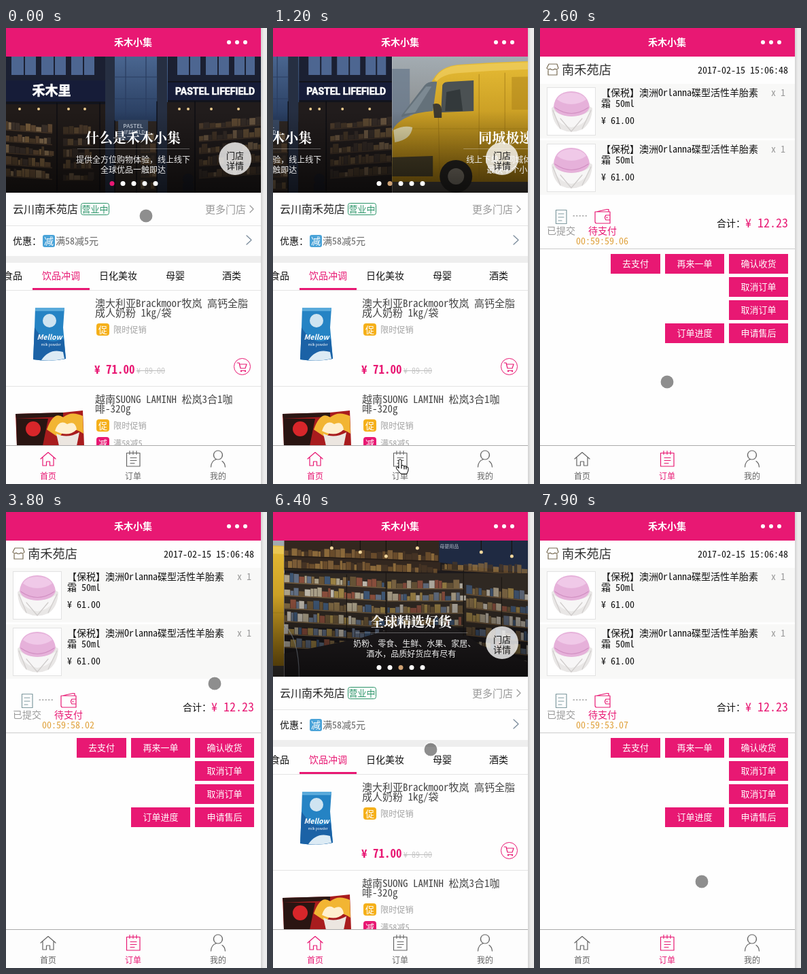
An HTML page for the animation above (8 s loop, 384 by 670 pixels).

```html
<!DOCTYPE html>
<html lang="zh">
<head>
<meta charset="utf-8">
<style>
html, body { margin: 0; width: 100%; height: 100%; overflow: hidden; background: #fff }
svg { display: block; width: 384px; height: 670px }
text { font-family: "Noto Sans CJK SC", "Noto Sans", sans-serif; white-space: pre }
.m { font-family: "Noto Sans Mono CJK SC", "Noto Sans CJK SC", monospace }
.k { font-family: "Noto Serif CJK SC", "Noto Sans CJK SC", serif; font-weight: bold }
.l { fill: none; stroke-width: 1.2; stroke-linejoin: round; stroke-linecap: round }
</style>
</head>
<body>
<svg id="stage" viewBox="0 0 384 670"></svg>
<script>
const PINK = '#e81873', LOOP = 8000;
const $ = id => document.getElementById(id);

let seed = 7;
const rnd = () => (seed = seed * 16807 % 2147483647) / 2147483647;

// cy is the middle of the glyphs
const text = (x, cy, size, str, fill, cls = 'm', more = '') =>
  `<text class="${cls}" x="${x}" y="${cy + size * .38}" font-size="${size}" fill="${fill}" ${more}>${str}</text>`;
const mid = (x, cy, size, str, fill, cls = '', more = '') =>
  text(x, cy, size, str, fill, cls, 'text-anchor="middle" ' + more);
const box = (x, y, w, h, fill, more = '') =>
  `<rect x="${x}" y="${y}" width="${w}" height="${h}" fill="${fill}" ${more}/>`;
const dot = (x, y, r, fill, more = '') => `<circle cx="${x}" cy="${y}" r="${r}" fill="${fill}" ${more}/>`;
const shape = (d, fill, more = '') => `<path d="${d}" fill="${fill}" ${more}/>`;
const line = (d, color, more = '') => `<path class="l" d="${d}" stroke="${color}" ${more}/>`;
const rule = (y, color = '#e4e4e4') => box(0, y, 375, 1, color);

// rows of goods on boards, leaning by the angle tilt
function shelves(x, y, w, rows, gap, colors, board, tilt = 0, opacity = 1) {
  let s = '';
  for (let r = 0; r < rows; r++) {
    const base = (r + 1) * gap;
    for (let i = 0; i < w - 4;) {
      const bw = 3 + rnd() * 6, bh = gap * (.35 + rnd() * .4);
      s += box(i.toFixed(1), (base - bh).toFixed(1), bw.toFixed(1), bh.toFixed(1),
        colors[rnd() * colors.length | 0]);
      i += bw + .5;
    }
    s += box(0, base, w, 1.5, board);
  }
  return `<g transform="translate(${x} ${y}) skewY(${tilt})" opacity="${opacity}">${s}</g>`;
}

const caption = (title, a, b, ax = 187) =>
  box(105, 177, 165, 1, '#fff', 'opacity=".3"') +
  mid(187, 161, 20, title, '#fff', 'k') +
  mid(ax, 193, 12, a, '#eee') + mid(187, 208, 12, b, '#eee');

function storefront() {
  const goods = ['#8f6f45', '#5f4930', '#a48660', '#463a31', '#74583b'];
  const panes = [[8, 36], [52, 36], [96, 34], [252, 34], [294, 34], [336, 30]];
  return box(0, 42, 375, 200, '#12141c') + box(0, 42, 375, 36, '#1b2032') +
    panes.map(([x, w]) => box(x, 42, w, 27, '#4d6691') + box(x + w / 2, 42, 2, 27, '#1b2032')).join('') +
    box(0, 77, 148, 31, '#161c38') + box(236, 80, 139, 26, '#161c38') +
    box(146, 42, 92, 96, 'url(#glass)') + box(146, 42, 14, 200, '#262f42') + box(222, 42, 15, 200, '#262f42') +
    line('M176 42V135M206 42V135M160 72H222M160 104H222', '#2a3d60') +
    box(0, 112, 146, 130, '#211b19') + shelves(0, 132, 68, 5, 17, goods, '#584330', 4, .8) +
    shelves(84, 138, 44, 5, 17, goods, '#4d3a29', 0, .5) +
    box(160, 137, 62, 105, '#2e2723') + shelves(198, 146, 24, 5, 18, goods, '#584330', 0, .6) +
    box(237, 109, 138, 133, '#211c1c') + shelves(284, 130, 91, 5, 18, goods, '#584330', -4, .55) +
    line('M75 110V242M138 110V242M160 136V242M192 138V242M222 108V242M278 108V242', '#090b11', 'stroke-width="5"') +
    [20, 48, 92, 116, 255, 268, 302, 342].map(x => dot(x, 119, 2, '#e9c98d')).join('') +
    dot(268, 222, 8, '#191a22') + box(260, 228, 16, 14, '#191a22') +
    box(165, 135, 44, 30, '#3a4a64') +
    mid(187, 144, 8, 'PASTEL', '#b9c3d2', '', 'font-weight="bold"') +
    mid(187, 153, 7, 'LIFEFIELD', '#b9c3d2', '', 'font-weight="bold"') +
    mid(67, 92, 19, '禾木里', '#fff', '', 'font-weight="bold" stroke="#fff" stroke-width=".6"') +
    text(249, 93, 14, 'PASTEL LIFEFIELD', '#fff', '',
      'style="font-family:Roboto,sans-serif;font-weight:bold" stroke="#fff" stroke-width=".6"') +
    box(0, 42, 375, 200, 'url(#shade)') +
    caption('什么是禾木小集', '提供全方位购物体验，线上线下', '全球优品一触即达');
}

function van() {
  return box(0, 42, 375, 200, 'url(#street)') + box(0, 60, 26, 88, '#66778a', 'opacity=".7"') +
    box(0, 200, 375, 42, '#47423d') +
    shape('M0 216V152Q6 136 30 128L60 76Q70 57 96 54Q230 44 375 50V226H0Z', 'url(#paint)') +
    shape('M62 76Q71 58 96 55Q230 46 375 51V62Q230 56 100 66Q76 67 66 78Z', '#f0cf62', 'opacity=".7"') +
    shape('M14 128L48 84Q53 78 66 79L60 122Q38 124 14 131Z', '#64717a') +
    shape('M18 126L50 86H58L34 124Z', '#8c9aa2', 'opacity=".6"') +
    shape('M74 84Q76 79 84 79L120 77V122L72 124Z', '#4b5153') +
    shape('M80 94L100 90L104 122H78Z', '#33393b') +
    shape('M176 72L258 70V120H176Z', '#a67c17', 'opacity=".45"') +
    line('M68 126L70 212M128 68V218M166 66V218M266 64V218', '#9a7414', 'opacity=".6"') +
    line('M30 148H375', '#aa8015', 'stroke-width="3" opacity=".7"') +
    shape('M60 112Q72 108 73 120V132H62Z', '#3d3a31') +
    shape('M2 150Q18 142 30 146Q28 164 4 168Z', '#e3d9a8') +
    shape('M0 190L60 188V218H0Z', '#4a4128') +
    dot(94, 218, 24, '#262421') + dot(94, 218, 12, '#777166') + dot(318, 220, 24, '#262421') +
    box(0, 42, 375, 200, 'url(#shade)') +
    caption('同城极速配送', '线上下单，同城体验极速配送', '最快半个小时送达');
}

function aisle() {
  const goods = ['#b9ad94', '#8a7048', '#cbc5b8', '#66758c', '#93513f', '#405a7d', '#6d5738', '#a68a48'];
  const warm = ['#76552f', '#a27b42', '#4a3826', '#8c6a3c'];
  return box(0, 42, 375, 200, '#1d1a1c') + box(0, 42, 230, 44, '#33271f') +
    shelves(0, 46, 228, 2, 18, warm, '#211914', 2, .8) +
    shape('M228 42H375V92L228 74Z', '#1f2a42') + mid(243, 50, 7, '母婴用品', '#b4bccb') +
    shelves(232, 66, 143, 2, 18, warm, '#6a4d2c', 3, .75) +
    box(0, 90, 375, 80, '#2f2822') + shelves(0, 84, 150, 6, 19, goods, '#7d6444', 3, .9) +
    shelves(152, 94, 112, 4, 18, goods, '#7d6444', 0, .8) +
    shelves(268, 100, 107, 6, 20, goods, '#75593a', 6, .75) +
    shape('M0 208L110 186L175 166H245L290 196L375 226V242H0Z', '#242022') +
    line('M92 92V188M150 88V178M264 86V182M320 96V210', '#1c1714', 'stroke-width="4"') +
    [70, 112, 150, 196, 290, 335].map((x, i) =>
      line(`M${x} 42V${50 + i % 3 * 6}`, '#17130f') + dot(x, 53 + i % 3 * 6, 2.5, '#f2d79c')).join('') +
    line('M0 166Q22 185 22 242', '#b9c6d6', 'opacity=".6"') +
    box(0, 42, 375, 200, 'url(#shade)') +
    caption('全球精选好货', '奶粉、零食、生鲜、水果、家居、', '酒水，品质好货应有尽有', 192);
}

const badge = (y, str, color, note) => box(133, y - 9, 19, 18, color, 'rx="4"') +
  mid(142.5, y, 13, str, '#fff') + text(158, y, 12.2, note, '#a4a4a4');

const pouch = shape('M43 411H86L84 440L88 486Q64 491 40 487L42 440Z', '#2583c4') +
  shape('M43 411H86L85.5 416H43Z', '#5aaadb') + shape('M42 440L40 487Q64 491 88 486L85 456Q60 470 42 440Z', '#1b62a6') +
  dot(64, 430, 10, '#cfe4f1') +
  mid(64, 454, 10.5, 'Mellow', '#fff', '', 'font-style="italic" font-weight="bold"') +
  mid(66, 465, 5, 'milk powder', '#fff') + shape('M52 488Q64 470 84 476L86 486Q68 490 52 488Z', '#dcebf5');

const coffee = shape('M14 567L84 565L113 562L115 614H16Z', '#a81c1e') + shape('M14 567L84 565V571L15 574Z', '#2b1714') +
  shape('M15 574H62L54 614H16Z', '#2a1512') + dot(40, 589, 11, '#d8262a') +
  shape('M60 590Q70 562 84 572Q96 562 113 570L114 596Q90 580 78 602Z', '#f2b533') +
  shape('M72 592Q78 574 90 582Q102 576 104 590Q92 602 72 592Z', '#fff0cf') +
  shape('M74 596Q90 604 108 594L104 614H78Z', '#ece6e0');

const home = () => box(0, 42, 375, 572, '#fefefe') +
  `<g clip-path="url(#frame)"><g id="slides">` +
  [storefront(), van(), aisle()].map((s, i) =>
    `<g transform="translate(${i * 375})" clip-path="url(#frame)">${s}</g>`).join('') + '</g></g>' +
  dot(337, 192, 24, '#fff', 'opacity=".78"') + mid(337, 187, 13, '门店', '#111') + mid(337, 202, 13, '详情', '#111') +
  [0, 1, 2, 3, 4].map(i => dot(156 + i * 16, 228.5, 3.5, '#fff', 'class="page"')).join('') +
  text(10, 266, 16, '云川南禾苑店', '#222') +
  box(110.5, 257.5, 41, 17, 'none', 'rx="3" stroke="#2a9468"') + mid(131, 266, 13, '营业中', '#2a9468') +
  text(293, 266, 15, '更多门店', '#999') + line('M359 261L364 266L359 271', '#999') + rule(290) +
  text(10, 313, 14, '优惠：', '#111') + box(54, 304, 18, 18, '#4aa3d8', 'rx="3"') +
  mid(63, 313, 14, '减', '#fff') + text(73, 313, 14, '满58减5元', '#666') +
  line('M354 305L361 311.5L354 318', '#789') + box(0, 335, 375, 10, '#eee') +
  [['食品', 10], ['饮品冲调', 81], ['日化美妆', 165], ['母婴', 249], ['酒类', 332]].map(([s, x], i) =>
    mid(x, 364, 14, s, i == 1 ? PINK : '#111')).join('') +
  rule(385) + box(39, 382, 84, 3, PINK) + pouch +
  text(131, 404, 15, '澳大利亚Brackmoor牧岚 高钙全脂', '#444') + text(131, 418, 15, '成人奶粉 1kg/袋', '#444') +
  badge(443, '促', '#f5b01a', '限时促销') +
  text(130, 502, 17, '¥ 71.00', PINK, 'm', 'font-weight="bold"') +
  text(192, 503, 12, '¥ 89.00', '#c8c8c8') + box(192, 503, 42, 1, '#bbb') +
  dot(347.5, 497.5, 12, '#fff', `stroke="${PINK}"`) +
  line('M340 492H343L345 500H352L354 494H344M346 503.5H352', PINK) +
  dot(346, 504, 1.2, PINK) + dot(352, 504, 1.2, PINK) + rule(526) + coffee +
  text(131, 545, 15, '越南SUONG LAMINH 松岚3合1咖', '#444') + text(131, 559, 15, '啡-320g', '#444') +
  badge(584, '促', '#f5b01a', '限时促销') + badge(610, '减', PINK, '满58减5');

const jar = `<rect x="10.5" y="87.5" width="71" height="70" fill="#fff" stroke="#e2e2e2"/>` +
  shape('M17 118Q20 112 46 112Q72 112 77 118Q76 140 62 149Q46 156 31 149Q18 140 17 118Z', '#e9e7e6') +
  shape('M20 122Q46 138 74 122Q70 142 46 146Q24 142 20 122Z', '#f7f6f6') +
  line('M19 121L30 148M75 121L62 148M30 133L46 152L62 133', '#cfcccb') +
  shape('M20 116Q22 94 46 93Q70 94 73 116Q70 129 46 130Q24 129 20 116Z', '#e6b1da') +
  shape('M25 105Q30 95 46 95Q62 95 68 105Q58 112 46 112Q34 112 25 105Z', '#f0c9e8') +
  line('M22 117Q46 134 71 117', '#d18fc2');

const item = dy => `<g transform="translate(0 ${dy})">` + box(0, 82, 375, 80, '#f8f8f7') + jar +
  text(90, 95, 14, '【保税】澳洲Orlanna碟型活性羊胎素', '#111') + text(90, 111, 14, '霜 50ml', '#111') +
  text(90, 136, 14, '¥ 61.00', '#111') + text(340, 95, 14, 'x 1', '#999') + '</g>';

const button = (x, y, w, str) => box(x, y, w, 29, PINK) + mid(x + w / 2, y + 14.5, 13, str, '#fff');

const order = () => box(0, 42, 375, 572, '#fefefe') +
  line('M13 53H25L27 59Q25 62 22 60Q18.500 63 15 60Q12 62 10 59ZM12 62V69H25V62', '#776a52') +
  text(32, 61, 18.3, '南禾苑店', '#333') + text(232, 62, 14, '2017-02-15 15:06:48', '#111') +
  item(0) + item(83) +
  line('M23.500 267.500H39V287.500H23.500ZM27 273H35M27 278H35M27 283H32', '#7f9a9f') +
  line('M49 276H70', '#777', 'stroke-dasharray="1.500 3" stroke-width="1.500"') +
  line('M83 270L98 266.500H101V270M81 270H103V287H83Q81 287 81 284ZM103 275H97Q94 278.500 97 282H103', PINK) +
  dot(98.5, 278.5, 1, PINK) +
  text(10, 298, 14, '已提交', '#999') + text(71, 298, 14, '待支付', PINK) +
  text(53, 313, 14, '', '#e0a23c', 'm', 'id="timer"') +
  text(260, 287, 14, '合计：', '#111') + text(302, 286, 18, '¥ 12.23', PINK) + rule(324, '#ccc') +
  button(104, 332, 73, '去支付') + button(184, 332, 87, '再来一单') + button(278, 332, 87, '确认收货') +
  button(278, 366, 87, '取消订单') + button(278, 400, 87, '取消订单') +
  button(184, 434, 87, '订单进度') + button(278, 434, 87, '申请售后');

const tab = (id, x, label, d) => `<g id="${id}" stroke="#666" fill="#666"><path class="l" d="${d}"/>` +
  `<text x="${x}" y="662.500" font-size="12" stroke="none" text-anchor="middle">${label}</text></g>`;

const fade = (id, from, to) => `<linearGradient id="${id}" x2="0" y2="1"><stop stop-color="${from}"/>` +
  `<stop offset="1" stop-color="${to}"/></linearGradient>`;

$('stage').innerHTML = `<defs>
  <clipPath id="frame"><rect y="42" width="375" height="200"/></clipPath>
  ${fade('glass', '#4a6690', '#263a5c')}${fade('street', '#a3acb2', '#6d6862')}${fade('paint', '#e6bb34', '#a87c12')}
  <linearGradient id="shade" x2="0" y2="1"><stop offset=".4" stop-opacity="0"/><stop offset="1" stop-opacity=".6"/></linearGradient>
  <linearGradient id="edge"><stop stop-color="#d2d2d2"/><stop offset=".5" stop-color="#ececec"/></linearGradient>
  </defs>` + box(0, 0, 384, 670, '#fefefe') +
  `<g id="home">${home()}</g><g id="order">${order()}</g>` + box(0, 42, 0, 2, '#4caf50', 'id="bar"') +
  box(0, 613, 375, 57, '#fdfdfd') + rule(613, '#aaa') +
  tab('tabHome', 62, '首页', 'M51 633L62 623.500L73 633M54 631V643H59.500V637H64.500V643H70V631') +
  tab('tabOrder', 187, '订单', 'M177.500 624.500H197V644H177.500ZM182 621.500V626.500M187 621.500V626.500M192 621.500V626.500M183 631.500H192M183 635.500H192M183 639.500H189') +
  tab('tabMine', 312, '我的', 'M312 621A6.500 6.500 0 1 1 311.900 621M301.500 645Q302 636 309 634M318 636.500Q322 639 322.500 645') +
  box(0, 0, 375, 42, PINK) + mid(187, 21, 14, '禾木小集', '#fff', '', 'font-weight="bold"') +
  [328, 340, 352].map(x => dot(x, 21, 3, '#fff')).join('') + box(375, 0, 9, 670, 'url(#edge)') +
  `<g id="touch">${dot(0, 0, 9.5, '#000', 'opacity=".44"')}${dot(0, 0, 10.4, 'none', 'stroke="#fff" stroke-opacity=".45" stroke-width="1.500"')}</g>` +
  `<g id="hand">${shape('M-2 1Q0 -2 2 1V9Q4 7 6 10Q8 8 9 11Q12 10 12 13V16L10 21H1L-5 14Q-7 10 -3 11L-2 13Z', '#fff', 'stroke="#000"')}${line('M2 9V13M6 10V14M9 11V14', '#000', 'stroke-width=".8"')}</g>`;

// [time, view, active tab]
const views = [[0, 'home', 'tabHome'], [1400, '', 'tabOrder'], [1800, 'order', 'tabOrder'],
  [5800, '', 'tabHome'], [6000, 'home', 'tabHome'], [7700, '', 'tabOrder'], [7800, 'order', 'tabOrder']];

// [time, x, y]
const path = [[0, 206, 276], [300, 206, 276], [1100, 187, 634], [1700, 187, 634], [2600, 187, 520],
  [2800, 78, 330], [3000, 150, 84], [3200, 374, 110], [3500, 306, 213], [3600, 306, 213], [3800, 307, 252],
  [4400, 232, 347], [4500, 232, 349], [6600, 232, 349], [7100, 185, 639], [7600, 185, 639], [7900, 238, 543], [8000, 238, 543]];

function pointer(t) {
  const i = path.findIndex(k => k[0] > t), [t0, x0, y0] = path[i - 1], [t1, x1, y1] = path[i];
  const p = (t - t0) / (t1 - t0);
  return [x0 + (x1 - x0) * p, y0 + (y1 - y0) * p];
}

const slideIn = (t, start) => {
  const p = Math.min(1, Math.max(0, (t - start) / 316));
  return p * (2 - p);
};

const show = (id, on) => $(id).style.display = on ? '' : 'none';
const pages = document.querySelectorAll('.page');

function draw(now) {
  const t = Math.floor(now % LOOP / 100) * 100;
  const [since, view, active] = views.filter(v => v[0] <= t).pop();
  show('home', view == 'home');
  show('order', view == 'order');
  $('bar').setAttribute('width', view ? 0 : (t - since) * .33);
  for (const id of ['tabHome', 'tabOrder']) {
    const color = id == active ? PINK : '#666';
    $(id).setAttribute('stroke', color);
    $(id).setAttribute('fill', color);
  }

  const pos = slideIn(t, 1100) + slideIn(t, 6150), current = Math.ceil(pos);
  $('slides').setAttribute('transform', `translate(${-375 * pos})`);
  pages.forEach((p, i) => p.setAttribute('fill', i != current ? '#fff' : pos < current ? '#cfa274' : PINK));

  const tenths = Math.min(599, 582 - Math.floor((t - 3800) / 90));
  $('timer').textContent = `00:59:${Math.floor(tenths / 10)}.0${tenths % 10}`;

  const [x, y] = pointer(t);
  for (const id of ['touch', 'hand']) {
    show(id, (id == 'hand') == (y > 613));
    $(id).setAttribute('transform', `translate(${x} ${y})`);
  }
}

const start = performance.now();
function tick() {
  draw(performance.now() - start);
  requestAnimationFrame(tick);
}
tick();
</script>
</body>
</html>
```
